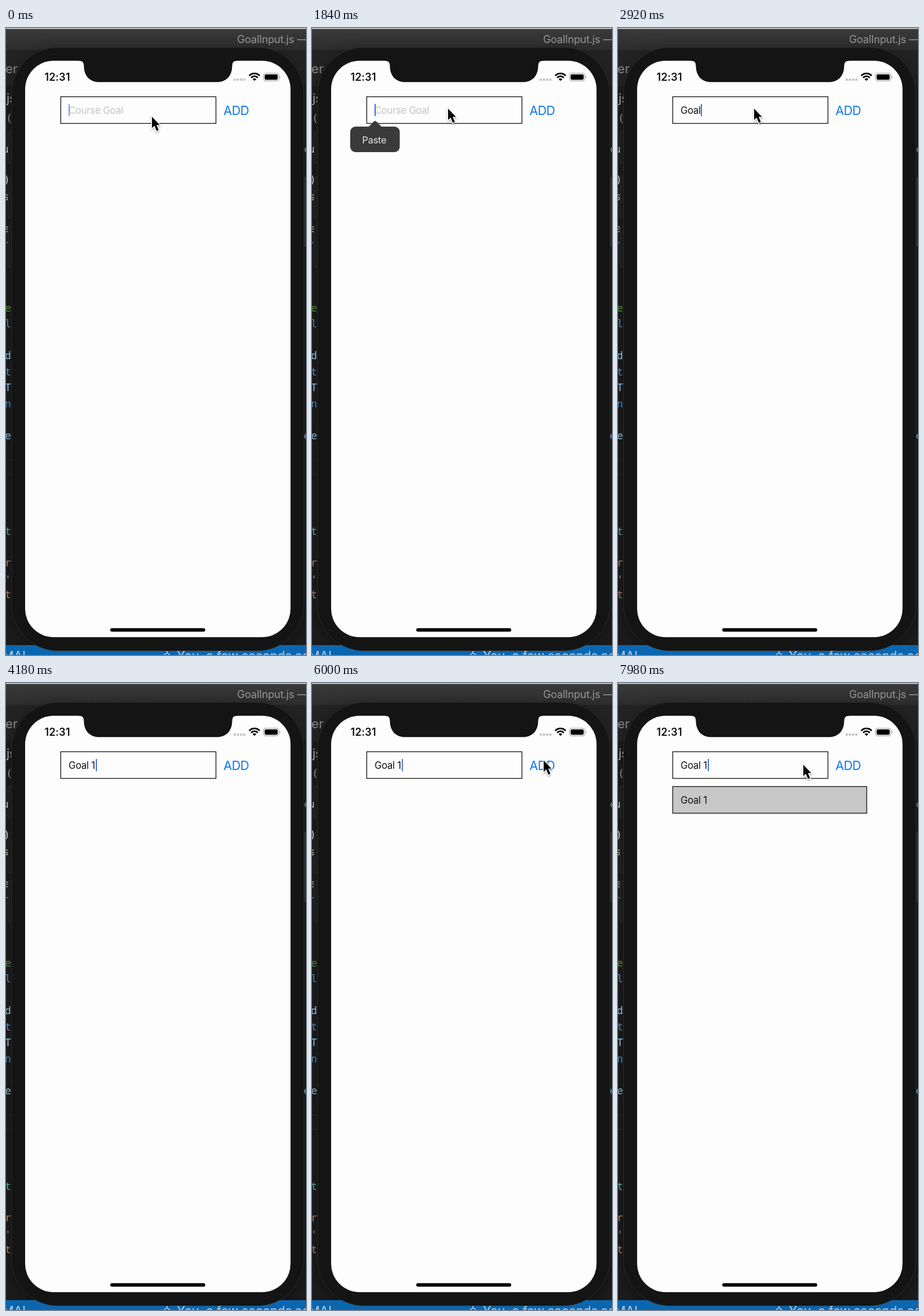
Write an HTML page that moves like this. It is 518 px wide and 1081 px high and loops after 8000 ms.

```html
<!DOCTYPE html>
<html lang="en">
<head>
<meta charset="utf-8">
<title>Course goals</title>
<style>
  html, body { margin: 0; width: 100%; height: 100%; overflow: hidden; background: #1a1a1a; }
  svg { position: absolute; left: 0; top: 0; overflow: hidden; }
  text, .typed { font-family: Inter, Roboto, sans-serif; white-space: pre; }
  .code text { font: 18px "DejaVu Sans Mono", monospace; }
  .field { font-size: 16.6px; letter-spacing: -.25px; }
  .anim, .typed, .caret { animation: 8s linear infinite; }

  .typed { position: absolute; left: 108px; top: 129.5px; height: 24px; line-height: 24px; animation-name: type; animation-timing-function: step-end; }
  .typed span { display: block; overflow: hidden; color: #111; }
  .caret { position: absolute; left: 100%; top: 1.5px; width: 2.2px; height: 21px; margin-left: -.2px; background: #426bf2; animation-name: blink; }
  .hint { animation-name: hint; animation-timing-function: step-end; }
  .item { animation-name: item; animation-timing-function: step-end; }
  .popup { animation-name: popup; }
  .add { animation-name: press; }
  .cursor { animation-name: move; }
  .pointer { animation-name: away; animation-timing-function: step-end; }

  @keyframes type {
    0% { width: 0; }
    31% { width: 12.1px; }
    32.5% { width: 22.1px; }
    34% { width: 31.2px; }
    35.5% { width: 35.2px; }
    41% { width: 39.8px; }
    44%, 100% { width: 47.6px; }
  }
  @keyframes hint { 0% { opacity: 1; } 31%, 100% { opacity: 0; } }
  @keyframes item { 0% { opacity: 0; } 81.8%, 100% { opacity: 1; } }
  @keyframes popup { 0%, 15% { opacity: 0; } 17%, 29% { opacity: 1; } 30.6%, 100% { opacity: 0; } }
  @keyframes press {
    0%, 78% { opacity: 1; }
    79.8%, 81.2% { opacity: .2; }
    82.5% { opacity: .45; }
    84.5%, 100% { opacity: 1; }
  }
  @keyframes blink {
    0% { opacity: .65; }
    1.5%, 2.7% { opacity: .1; }
    4.5%, 12.4% { opacity: 1; }
    14%, 15.2% { opacity: .1; }
    17%, 24.9% { opacity: 1; }
    26.5%, 27.7% { opacity: .1; }
    29.5%, 62.4% { opacity: 1; }
    64%, 65.2% { opacity: .1; }
    67%, 74.9% { opacity: 1; }
    76.5%, 77.7% { opacity: .1; }
    79.5%, 87.4% { opacity: 1; }
    89%, 90.2% { opacity: .1; }
    92%, 99.8% { opacity: 1; }
    100% { opacity: .65; }
  }
  @keyframes move {
    0%, 2% { transform: translate(252px, 153px); animation-timing-function: ease-in-out; }
    9%, 56% { transform: translate(235px, 139px); animation-timing-function: ease-in-out; }
    64%, 67% { transform: translate(408px, 126.5px); animation-timing-function: ease-in-out; }
    73%, 87% { transform: translate(400px, 133.5px); animation-timing-function: ease-in-out; }
    97%, 100% { transform: translate(320px, 141px); }
  }
  @keyframes away { 0% { opacity: 1; } 41% { opacity: 0; } 56%, 100% { opacity: 1; } }
</style>
</head>
<body>
<svg width="518" height="1081" viewBox="0 0 518 1081">
  <defs>
    <linearGradient id="bar" x2="0" y2="1">
      <stop stop-color="#3a3a3a"/><stop offset="1" stop-color="#2c2c2c"/>
    </linearGradient>
    <filter id="soft" x="-20%" y="-10%" width="140%" height="120%"><feGaussianBlur stdDeviation="14"/></filter>
  </defs>

  <!-- editor window -->
  <rect width="518" height="1081" fill="#1c1c1c"/>
  <rect y="2" width="518" height="36" fill="url(#bar)"/>
  <rect y="38" width="518" height="62" fill="#232324"/>
  <rect width="518" height="1.6" fill="#dcdcda"/>
  <path d="M0 745.5H12M0 769.5H12" stroke="#2b2b24"/>
  <rect x="12" y="44" width="500" height="1034" rx="78" opacity=".45" filter="url(#soft)"/>
  <rect y="1064" width="518" height="17" fill="#0b66b0"/>

  <text x="399" y="26" font-size="18" letter-spacing="-.2" fill="#969696">GoalInput.js —</text>
  <text x="-1" y="78" font-size="22" fill="#858585">er</text>
  <text x="1" y="129" font-size="21" fill="#a8a8a8">js</text>
  <g class="code">
    <text x="0" y="162" fill="#8c8c8c">(</text>
    <text x="-6" y="215" fill="#c4c4c4">u</text>
    <text x="-4" y="268" fill="#c8c8c8">)</text>
    <text x="-5" y="297" fill="#c9c68c">s</text>
    <text x="-5" y="352" fill="#b9bd84">e</text>
    <text x="-5" y="379" fill="#4a94c8">r</text>
    <text x="-2" y="489" fill="#4f8a3c">e</text>
    <text x="-2" y="516" fill="#3f86c4">l</text>
    <text x="-2" y="571" fill="#86b9d8">d</text>
    <text x="-2" y="599" fill="#3f86c4">t</text>
    <text x="-2" y="626" fill="#86b9d8">T</text>
    <text x="-2" y="654" fill="#3f86c4">n</text>
    <text x="-2" y="709" fill="#86b9d8">e</text>
    <text x="-2" y="874" fill="#3fae90">t</text>
    <text x="-2" y="928" fill="#b0735a">r</text>
    <text x="-2" y="957" fill="#b0735a">'</text>
    <text x="-2" y="983" fill="#b0735a">t</text>
    <text x="514" y="215" fill="#b0735a">c</text>
    <text x="514" y="709" fill="#4a94c8">e</text>
  </g>
  <g fill="#b4d0e8" font-size="21.5">
    <text x="-6" y="1090">MAL</text>
    <text x="295" y="1090">You, a few seconds ago</text>
  </g>
  <g fill="none" stroke="#b4d0e8" stroke-width="1.6"><circle cx="278" cy="1083" r="5"/><path d="M278 1073V1078"/></g>

  <!-- phone -->
  <g fill="#1b1b1c" stroke="#2c2c2c">
    <rect x="3.5" y="178" width="9" height="55" rx="2"/>
    <rect x="3.5" y="257" width="9" height="71" rx="2"/>
    <rect x="3.5" y="341" width="9" height="71" rx="2"/>
    <rect x="510" y="257" width="10" height="120" rx="2" fill="#2c2c2c"/>
  </g>
  <rect x="9.5" y="33.5" width="505" height="1040" rx="80" fill="#141414" stroke="#2b2b27"/>
  <rect x="33" y="56.6" width="458.3" height="993.6" rx="49" fill="#fdfdfd"/>
  <path d="M126 55V56.6Q134.5 56.6 134.5 65C134.5 83 145 93.3 161 93.3H364C380 93.3 390.5 83 390.5 65Q390.5 56.6 399 56.6V55Z" fill="#141414"/>
  <text x="66.5" y="91" font-size="18" font-weight="600" letter-spacing=".1" fill="#111">12:31</text>
  <g fill="#c6c6c8">
    <circle cx="395" cy="89" r="2.2"/><circle cx="400.5" cy="89" r="2.2"/>
    <circle cx="406" cy="89" r="2.2"/><circle cx="411.5" cy="89" r="2.2"/>
  </g>
  <g fill="none" stroke="#000" stroke-width="2.8">
    <path d="M420 82.2A12.5 12.5 0 0 1 438 82.2"/>
    <path d="M423.3 85.7A7.8 7.8 0 0 1 434.7 85.7"/>
  </g>
  <path d="M425.8 88Q429 85.5 432.2 88L429 91.2Z"/>
  <rect x="444.6" y="78.1" width="26.5" height="13" rx="3.8" fill="none" stroke="#a4a4a4" stroke-width="1.2"/>
  <rect x="446.6" y="80" width="22.5" height="9.2" rx="2.2"/>
  <path d="M472.5 82.3Q475.4 84.6 472.5 86.9Z" fill="#a4a4a4"/>
  <rect x="180" y="1034.8" width="164" height="6" rx="3"/>

  <!-- app -->
  <rect x="94.5" y="118.5" width="268" height="46" fill="none" stroke="#111" stroke-width="1.3"/>
  <text class="field anim hint" x="108" y="147.5" fill="#c4c4c6">Course Goal</text>
  <text class="anim add" x="375.5" y="149.5" font-size="21.4" letter-spacing="-.6" fill="#0a78f0">ADD</text>
  <g class="anim item">
    <rect x="94.5" y="178.5" width="335" height="46" fill="#c7c7c7" stroke="#111" stroke-width="1.3"/>
    <text class="field" x="108" y="207.5" fill="#111">Goal 1</text>
  </g>
  <g class="anim popup">
    <path d="M97 171L106.5 161.5Q109 159 111.5 161.5L121 171Z" fill="#3a3a3a"/>
    <rect x="66" y="170" width="85.5" height="44" rx="9" fill="#3a3a3a"/>
    <text x="86.5" y="198.5" font-size="16.5" letter-spacing="-.3" fill="#e4e4e4">Paste</text>
  </g>
</svg>

<div class="typed field"><span>Goal 1</span><i class="caret"></i></div>

<svg width="518" height="1081" viewBox="0 0 518 1081">
  <defs>
    <filter id="shade" x="-50%" y="-50%" width="200%" height="200%">
      <feDropShadow dx="0" dy="1.5" stdDeviation="1.5" flood-opacity=".4"/>
    </filter>
  </defs>
  <g class="anim pointer">
    <g class="anim cursor">
      <path d="M0 0V19.5L4.4 15.5L8.2 24.5L11.7 23L7.9 14.2H13.6Z" stroke="#fff" stroke-width="2.6" paint-order="stroke" filter="url(#shade)"/>
    </g>
  </g>
</svg>
</body>
</html>
```
